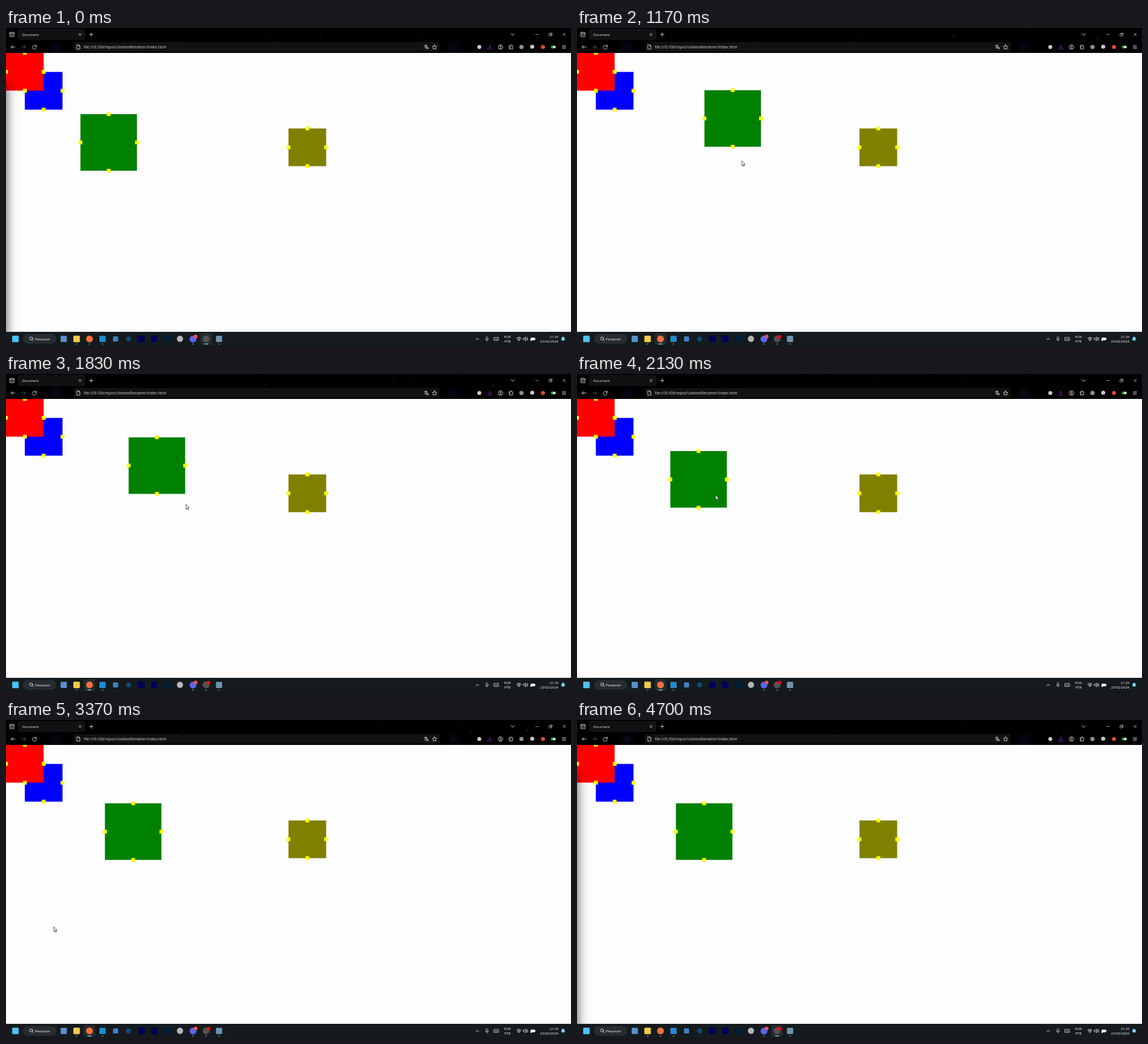
An HTML page with a canvas for the animation above (4.83 s loop, 998 px wide and 561 px high).

```html
<!DOCTYPE html>
<html lang="pt-BR">
<head>
<meta charset="utf-8">
<title>Document</title>
<style>
html, body { margin: 0; width: 100%; height: 100%; overflow: hidden; background: #000; }
canvas { display: block; }
</style>
</head>
<body>
<canvas id="stage" width="998" height="561"></canvas>
<script>
const ctx = document.getElementById('stage').getContext('2d');
const LOOP = 4830, FOCUS = 570, BLUR = 4350, BADGE = 300;

// Keys: time, x, y
const boxKeys = [
  [FOCUS, 131.5, 152], [1170, 225, 109.7], [1530, 259.3, 97.7], [1830, 216.8, 111.6],
  [2130, 165, 136], [2270, 153, 143], [2600, 174.7, 147]
];
const cursorKeys = [
  [60, -8, 300], [480, 190, 200], [FOCUS, 197, 193], [1170, 291, 234.5], [1530, 321.3, 249],
  [1830, 318, 230], [2130, 245, 213.5], [2270, 222, 214], [2600, 246, 222],
  [2800, 240, 226], [3370, 84.8, 364.5], [3640, -8, 412]
];

// Monotone cubic interpolation along one axis
function axisAt(keys, axis, t) {
  const last = keys.length - 1;
  if (t <= keys[0][0]) return keys[0][axis];
  if (t >= keys[last][0]) return keys[last][axis];
  const slope = i => i < 0 || i >= last ? 0 :
    (keys[i + 1][axis] - keys[i][axis]) / (keys[i + 1][0] - keys[i][0]);
  const tangent = i => {
    const a = slope(i - 1), b = slope(i);
    return a * b <= 0 ? 0 : 2 * a * b / (a + b);
  };
  const i = keys.findIndex(k => k[0] > t) - 1;
  const span = keys[i + 1][0] - keys[i][0], u = (t - keys[i][0]) / span;
  const s = u * u * (3 - 2 * u);
  return keys[i][axis] * (1 - s) + keys[i + 1][axis] * s
    + span * u * (1 - u) * ((1 - u) * tangent(i) - u * tangent(i + 1));
}
const pointAt = (keys, t) => [axisAt(keys, 1, t), axisAt(keys, 2, t)];

function rect(x, y, w, h, color, radius = 0) {
  ctx.fillStyle = color;
  ctx.beginPath();
  ctx.roundRect(x, y, w, h, radius);
  ctx.fill();
}
const square = (x, y, size, color) => rect(x - size / 2, y - size / 2, size, size, color, 1.5);
const circle = (x, y, r, color) => rect(x - r, y - r, 2 * r, 2 * r, color, r);

function text(str, x, y, size, color = '#fff', align = 'left') {
  ctx.font = `${size}px "Open Sans", "Noto Sans", sans-serif`;
  ctx.textAlign = align;
  ctx.fillStyle = color;
  ctx.fillText(str, x, y);
}

function icon(x, y, path, color = '#ddd', width = 0.9) {
  ctx.save();
  ctx.translate(x, y);
  ctx.strokeStyle = color;
  ctx.lineWidth = width;
  ctx.lineCap = ctx.lineJoin = 'round';
  ctx.stroke(new Path2D(path));
  ctx.restore();
}

function glow(x, y, r, color) {
  const g = ctx.createRadialGradient(x, y, 0, x, y, r);
  g.addColorStop(0, color);
  g.addColorStop(1, 'transparent');
  rect(x - r, y - r, 2 * r, 2 * r, g);
}

let seed = 7;
const random = () => (seed = seed * 16807 % 2147483647) / 2147483647;
const stars = Array.from({ length: 60 }, () => ({
  x: random() * 998, y: random() * 21, size: 0.4 + random() * 0.6,
  alpha: 0.15 + random() * 0.5, phase: random() * 6.28
}));

function drawHeader(t) {
  rect(0, 0, 998, 44, '#000');
  for (const s of stars) {
    const alpha = s.alpha * (0.6 + 0.4 * Math.sin(t / LOOP * 6.283 * 2 + s.phase));
    rect(s.x, s.y, s.size, s.size, `rgba(255,255,255,${alpha})`);
  }
  glow(88, 34, 20, 'rgba(50,20,100,.3)');
  glow(790, 34, 20, 'rgba(50,20,100,.3)');

  rect(22, 2, 0.7, 18, '#3a3a3e');
  rect(24, 2.5, 115, 18, '#2b2b30', 2.5);
  rect(24.5, 3, 114, 17, '#111114', 2);
  text('Document', 28.5, 14, 6.1, '#f5f5f7');
  icon(130.7, 11.5, 'M-2-2 2 2M2-2-2 2');
  icon(150.5, 11.5, 'M-3 0H3M0-3V3');
  icon(10.5, 11.5, 'M-4-1.8H4M-3.5-1.5V3.8H3.5V-1.5M-3-3.8H3L4-1.8M-4-1.8-3-3.8M-1.5 1H1.5');
  icon(895, 11.5, 'M-3-1.5 0 1.5 3-1.5');
  icon(938, 11.5, 'M-2.5 0H2.5', '#ddd', 0.7);
  icon(962, 11.5, 'M-2.5-1.2H1.2V2.5H-2.5ZM-1.2-1.2V-2.5H2.5V1.2H1.2', '#ddd', 0.7);
  icon(986, 11.5, 'M-2.3-2.3 2.3 2.3M2.3-2.3-2.3 2.3', '#ddd', 0.7);

  icon(12.5, 33.5, 'M3.5 0H-3.5M-.5-3-3.5 0-.5 3');
  icon(31, 33.5, 'M-3.5 0H3.5M.5-3 3.5 0 .5 3', '#5a5a5e');
  icon(50, 33.8, 'M2.6-2.2A3.5 3.5 0 1 0 3.5.5M3.4-3.8V-1.3H.9');
  rect(120, 25, 645.5, 17, '#121214', 2);
  icon(128, 33.5, 'M-2.6-3.7H.6L2.6-1.7V3.7H-2.6ZM.6-3.7V-1.7H2.6');
  text('file:///E:/Git/repos/UselessRenderer/index.html', 137.5, 36, 6.66, '#dcdce0');
  icon(742.5, 33.5, 'M-3.6-2.6H1.4M-1-3.8V-2.6M.4-2.6Q-.8.8-3.4 2M-2.4-1Q-1 .8.4 1.4M0 3.6 1.9-.6 3.8 3.6M.7 2.2H3.2');
  icon(757, 33.5, 'M0-3.9 1.2-1.3 4-1 1.9 1 2.5 3.8 0 2.4-2.5 3.8-1.9 1-4-1-1.2-1.3Z');

  circle(836, 33.5, 3.5, '#c9c9cd');
  icon(854.5, 33.5, 'M0-3.8V1.2M-2.3-.9 0 1.4 2.3-.9M-3.6 1.8V3.6H3.6V1.8', '#8a1fc4');
  icon(873.5, 33.5, 'M4 0A4 4 0 1 1-4 0A4 4 0 1 1 4 0M1.3-1A1.3 1.3 0 1 1-1.3-1A1.3 1.3 0 1 1 1.3-1M-2.4 2.8Q0 .2 2.4 2.8');
  icon(892, 33.5, 'M-3-2H-1V-3.5H1V-2H3V3.5H-3V1.8H-1.5V0H-3Z');
  circle(910.5, 33.5, 3.8, '#8d9089');
  circle(929.5, 33, 3.6, '#c8c8c8');
  circle(948.5, 33.5, 3.6, '#d84a32');
  rect(962.7, 31, 8.5, 5, '#45b652', 2.5);
  circle(968.7, 33.5, 1.9, '#fff');
  icon(985.5, 33.5, 'M-3-2.5H3M-3 0H3M-3 2.5H3');
}

function drawBox(x, y, size, color) {
  rect(x, y, size, size, color);
  const half = size / 2, d = 6.6;
  for (const [hx, hy] of [[half, 0], [size, half], [half, size], [0, half]])
    rect(x + hx - d / 2, y + hy - d / 2, d, d, '#ff0');
}

function drawPage(t, focused) {
  ctx.save();
  ctx.beginPath();
  ctx.rect(0, 44, 998, 492);
  ctx.clip();
  rect(0, 44, 998, 492, '#fdfdfd');
  drawBox(33.3, 77.5, 66.5, '#00f');
  drawBox(0, 44, 66.5, '#f00');
  drawBox(...pointAt(boxKeys, t), 99.8, '#008000');
  drawBox(499, 177.2, 66.5, '#808000');
  if (!focused) {
    ctx.shadowColor = 'rgba(0,0,0,.7)';
    ctx.shadowBlur = 19;
    rect(-100, 100, 100, 500, '#000');
  }
  ctx.restore();
}

function drawTaskbar(t, focused) {
  rect(0, 536, 998, 25, '#141a1d');
  square(16.7, 548.5, 11.5, '#4cc2f5');
  rect(30, 540, 59, 17, '#262c2f', 8.5);
  icon(45, 548.3, 'M2-.6A2.6 2.6 0 1 1-3.2-.6A2.6 2.6 0 1 1 2-.6M1.3 1.3 3.3 3.3', '#fff');
  text('Pesquisar', 51, 551, 5.9);

  const active = focused ? 147.5 : 353.5;
  rect(active - 10, 538.5, 20, 20, 'rgba(255,255,255,.08)', 2);
  square(102, 548.5, 11, '#5b8fc9');
  square(124.7, 548.5, 11.5, '#f7c945');
  circle(147.5, 548.5, 6, '#f5703a');
  square(170.5, 548.5, 11, '#1f8ad2');
  square(193.5, 548.5, 9, '#3f7fc4');
  circle(216.5, 548.5, 4.5, '#0e4a78');
  square(239, 548.2, 11.5, '#00005b');
  square(262, 548.2, 11.5, '#00005b');
  square(284.8, 548.2, 11.5, '#001e36');
  circle(307.3, 548.3, 5.5, '#b4b7b9');
  circle(330.3, 548.7, 6, '#5865f2');
  circle(335, 544.2, 3.2, '#e8564f');
  circle(353.5, 548.5, 6, '#515357');
  if (t >= BADGE) circle(357.8, 544.6, 3.2, '#f00b0b');
  square(376.3, 548.5, 11, '#6d93ad');
  for (const x of [124.7, 147.5, 170.5, 330.3, 353.5, 376.3]) {
    const w = x === active ? 7.5 : 2.8;
    rect(x - w / 2, 556.8, w, 1.4, x === active ? '#76cfea' : '#8e9497', 0.7);
  }

  icon(832.5, 548.5, 'M-2.5 1.3 0-1.3 2.5 1.3', '#fff');
  icon(849.7, 548.5, 'M-1.2-3.5H1.2V.7H-1.2ZM-2.6 0Q-2.4 2.3 0 2.3T2.6 0M0 2.3V3.8', '#ddd', 0.7);
  icon(866, 548.5, 'M-4-2.6H4V2.6H-4ZM-2.5-1H-2.3M-.2-1H0M2.2-1H2.4M-2 1.2H2', '#ddd', 0.8);
  text('POR', 885.7, 547, 6, '#fff', 'center');
  text('PTB', 885.7, 555.3, 6, '#fff', 'center');
  icon(906, 548.5, 'M-4-1Q0-4.8 4-1M-2.6.6Q0-1.8 2.6.6M-1.1 2.1Q0 1.2 1.1 2.1M0 2.9V3', '#fff', 1);
  icon(918, 548.5, 'M-4-1.3H-2.4L-.2-3.4V3.4L-2.4 1.3H-4ZM1.4-1.5Q2.4 0 1.4 1.5M2.9-2.8Q4.8 0 2.9 2.8', '#fff', 0.8);
  rect(926.8, 546.3, 7.5, 4.6, '#fff', 1);
  rect(934.4, 547.6, 1, 2, '#fff');
  circle(927.8, 550.3, 1.7, '#fff');
  text('21:39', 975.6, 547, 5.95, '#fff', 'right');
  text('23/02/2024', 975.6, 555.3, 6.1, '#fff', 'right');
  ctx.save();
  ctx.translate(984, 548.5);
  ctx.fillStyle = '#7fd6f4';
  ctx.fill(new Path2D('M-3.7 2.2-2.6 0V-1.2A2.6 2.6 0 0 1 2.6-1.2V0L3.7 2.2ZM-1.3 2.8H1.3Q0 4.7-1.3 2.8'));
  ctx.restore();
}

const arrow = new Path2D('M0 0V8.4L1.9 6.7 3.2 9.7 4.6 9.1 3.3 6.1H5.8Z');
function drawCursor(t) {
  if (t > 3640) return;
  ctx.save();
  ctx.translate(...pointAt(cursorKeys, t));
  ctx.fillStyle = '#fff';
  ctx.strokeStyle = '#000';
  ctx.lineWidth = 0.7;
  ctx.fill(arrow);
  ctx.stroke(arrow);
  ctx.restore();
}

function frame() {
  const t = performance.now() % LOOP;
  const focused = t >= FOCUS && t < BLUR;
  drawHeader(t);
  drawPage(t, focused);
  drawTaskbar(t, focused);
  drawCursor(t);
  requestAnimationFrame(frame);
}
frame();
</script>
</body>
</html>
```
